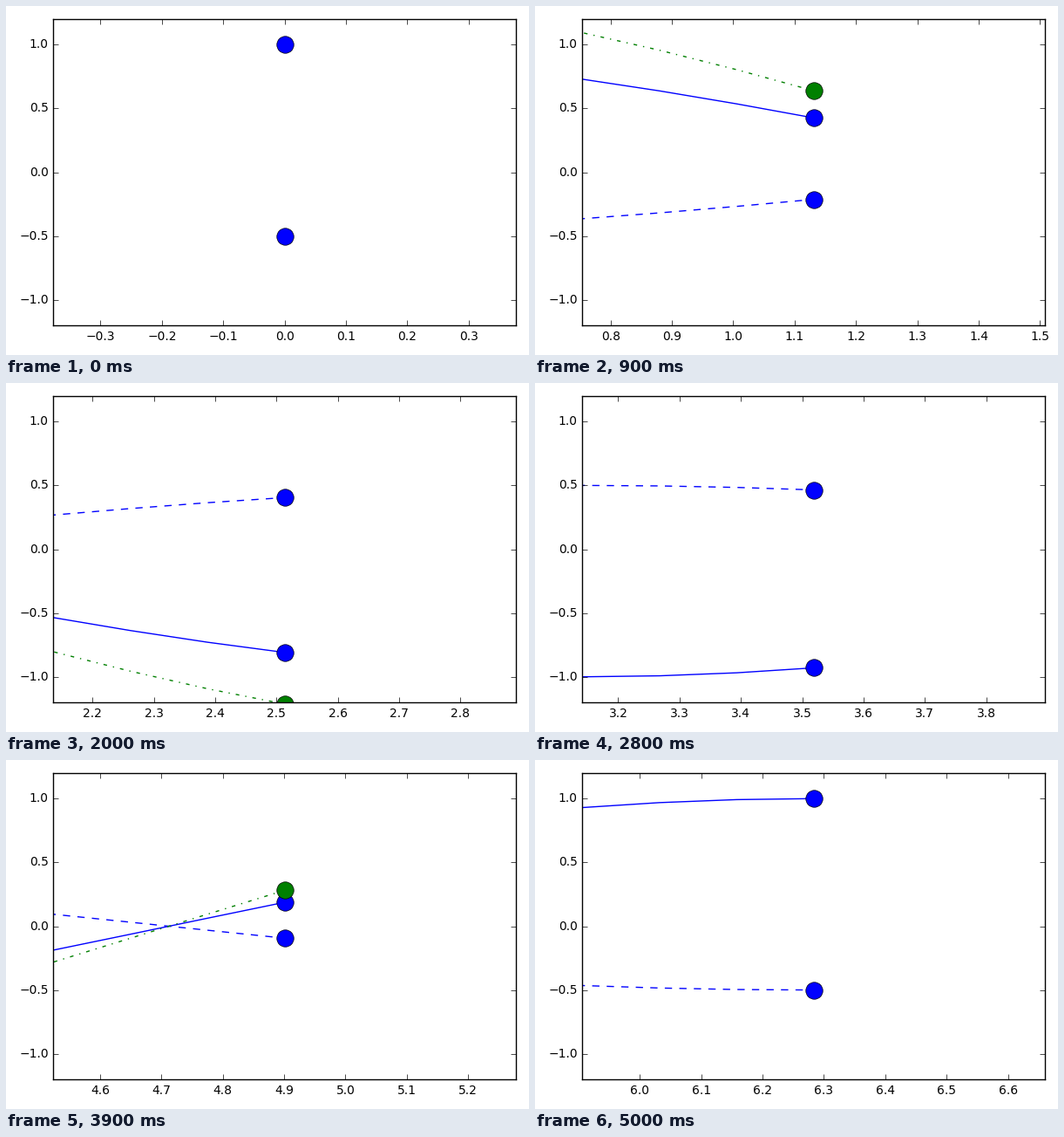
Write a matplotlib script that moves like this. It is 600 by 400 pixels and loops after 5100 ms.

```python
import math

import numpy as np
import matplotlib.pyplot as plt
from matplotlib.animation import FuncAnimation

W, H, DPI = 600, 400, 100
STEPS = 50
INTERVAL = 100
HALF_VIEW = 0.06 * 2 * math.pi

plt.style.use("classic")
plt.rcParams.update({
    "font.family": "DejaVu Sans",
    "font.size": 10,
    "figure.facecolor": "white",
    "savefig.facecolor": "white",
})

x = np.linspace(0, 2 * math.pi, STEPS + 1)

# amplitude, colour, line style
WAVES = [(1.0, "b", "-"), (-0.5, "b", "--"), (1.5, "g", "-.")]


def tick_label(value):
    return f"{value:.1f}".replace("-", "\u2212")


fig = plt.figure(figsize=(W / DPI, H / DPI), dpi=DPI)
left, right, bottom, top = 54.3, 585, 34, 385
ax = fig.add_axes([left / W, bottom / H, (right - left) / W, (top - bottom) / H])
ax.set_ylim(-1.2, 1.2)
y_ticks = [-1.0, -0.5, 0.0, 0.5, 1.0]
ax.set_yticks(y_ticks, [tick_label(v) for v in y_ticks])

curves = []
for amp, color, style in WAVES:
    y = amp * np.cos(x)
    trail, = ax.plot([], [], color=color, linestyle=style)
    head, = ax.plot([], [], color=color, marker="o", markersize=14)
    curves.append((y, trail, head))


def update(i):
    lo, hi = x[i] - HALF_VIEW, x[i] + HALF_VIEW
    ax.set_xlim(lo, hi)
    # only ticks strictly inside the view
    first = math.floor(lo * 10 + 1e-6) + 1
    last = math.ceil(hi * 10 - 1e-6) - 1
    ticks = [k / 10 for k in range(first, last + 1)]
    ax.set_xticks(ticks, [tick_label(v) for v in ticks])
    for y, trail, head in curves:
        trail.set_data(x[:i + 1], y[:i + 1])
        head.set_data([x[i]], [y[i]])
    return []


anim = FuncAnimation(fig, update, frames=STEPS + 1, interval=INTERVAL,
                     repeat=True, repeat_delay=0, blit=False)

plt.show()
```
